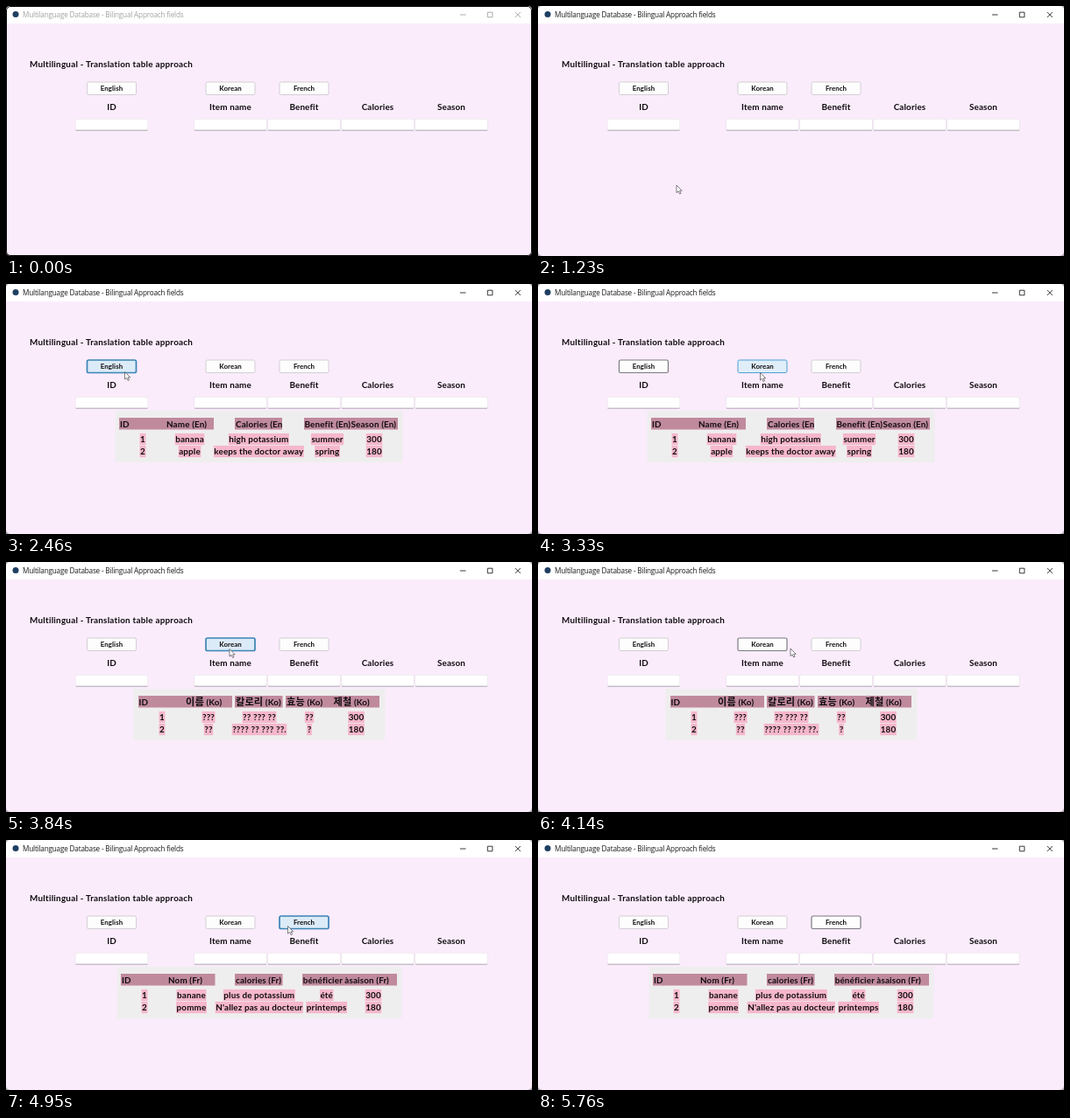
An HTML page for the animation above (5940 ms loop, 600x286 px).

```html
<!DOCTYPE html>
<html lang="en">
<head>
<meta charset="utf-8">
<title>Translation table demo</title>
<style>
  html, body { margin: 0; width: 100%; height: 100%; overflow: hidden; }
  svg { display: block; width: 600px; height: 286px; }
  text { font: bold 9.9px Lato, "Noto Sans CJK KR", "Noto Sans CJK", sans-serif; letter-spacing: .14px; fill: #100c10; white-space: pre; }
  .mid { text-anchor: middle; }
  .heading { letter-spacing: .24px; }
  .button text { font-size: 7.9px; letter-spacing: .05px; }
  .caption { font: 8.2px "Open Sans", "Noto Sans", sans-serif; letter-spacing: -.2px; fill: #1c1c1c; }
  .hangul { font-size: 11.2px; }
  .controls { fill: none; stroke: #222; stroke-width: .9; }
  .edge { fill: none; stroke: none; }
  .inactive .caption { fill: #a3a3a3; }
  .inactive .controls { stroke: #a0a0a0; }
  .inactive .back { fill: #000; }
  .inactive .edge { stroke: #000; }
  .button rect { fill: #fdfdfd; stroke: #d2ced3; }
  .button.hover rect { fill: #e0eef9; stroke: #4c9fd3; }
  .button.strong rect { fill: #dcebf8; stroke: #3b84b6; stroke-width: 1.7; }
  .button.pressed rect { fill: #cce4f7; stroke: #35709f; stroke-width: 1.4; }
  .button.focus rect { stroke: #7b7b80; stroke-width: 1.2; }
</style>
</head>
<body>
<svg id="stage" viewBox="0 0 600 286">
  <rect class="back" width="600" height="286" fill="#a7a2aa"/>
  <rect width="600" height="286" rx="5" fill="#faecfb"/>
  <path d="M0 20V5Q0 0 5 0H595Q600 0 600 5V20Z" fill="#fff"/>
  <rect class="edge" x=".5" y=".5" width="599" height="285" rx="4.5"/>
  <circle cx="11" cy="9.5" r="3.5" fill="#1f3f63"/>
  <text class="caption" x="19" y="12.9">Multilanguage Database - Bilingual Approach fields</text>
  <path class="controls" d="M518 10H524.5M549.3 7.2h5.6v5.6h-5.6ZM580.8 7l6 6m0-6l-6 6"/>
  <text class="heading" x="27" y="70.1">Multilingual - Translation table approach</text>
  <g id="form"></g>
  <g id="tables"></g>
  <path id="cursor" d="M0 0V8.6L2.1 6.8L3.6 10L5 9.3L3.6 6.3H6.2Z" fill="#fff" stroke="#4a484c" stroke-width=".7"/>
</svg>
<script>
const LOOP = 5940;
const $ = id => document.getElementById(id);

function add(parent, tag, attrs, content = "") {
  const node = document.createElementNS("http://www.w3.org/2000/svg", tag);
  for (const key in attrs) node.setAttribute(key, attrs[key]);
  node.innerHTML = content;
  return parent.appendChild(node);
}

const rect = (parent, x, y, width, height, fill, rx = 0) =>
  add(parent, "rect", { x, y, width, height, fill, rx });

const label = (parent, x, y, content, cls = "") =>
  add(parent, "text", { x, y, class: cls },
    content.replace(/[가-힣]+/g, '<tspan class="hangul">$&</tspan>'));

// Form: column titles, entry fields and language buttons
[[120.5, "ID"], [256, "Item name"], [340, "Benefit"], [424, "Calories"], [508, "Season"]]
  .forEach(([x, name]) => {
    label($("form"), x, 119.2, name, "mid");
    rect($("form"), x - 41.5, 129, 83, 13.5, "#e6e0e8", 1.5);
    rect($("form"), x - 41, 129.4, 82, 12.6, "#fff", 1.5);
    rect($("form"), x - 41, 141.7, 82, .9, "#aaa4ac");
  });

const buttons = [[120.5, "English"], [256, "Korean"], [340, "French"]].map(([x, name]) => {
  const group = add($("form"), "g", { class: "button" });
  rect(group, x - 28, 87, 56, 14.5, "", 1.8);
  label(group, x, 97.2, name, "mid");
  return group;
});

// Result tables: panel, header bars, header texts, column centres, rows
const tables = [
  {
    panel: [124.5, 452.5],
    bars: [[129, 237], [261, 315], [340, 447]],
    head: [[130, "ID"], [183, "Name (En)"], [262, "Calories (En"], [340.5, "Benefit (En)"], [393.5, "Season (En)"]],
    cols: [156, 209.5, 288.3, 366.5, 420],
    rows: [["1", "banana", "high potassium", "summer", "300"],
           ["2", "apple", "keeps the doctor away", "spring", "180"]]
  },
  {
    panel: [145.5, 432.5],
    bars: [[151, 258], [261, 315.5], [319, 426]],
    head: [[151.5, "ID"], [205, "이름 (Ko)"], [262, "칼로리 (Ko)"], [320, "효능 (Ko)"], [373.5, "제철 (Ko)"]],
    cols: [178, 231, 289, 346, 399.5],
    rows: [["1", "???", "?? ??? ??", "??", "300"],
           ["2", "??", "???? ?? ??? ??.", "?", "180"]]
  },
  {
    panel: [126.5, 451.5],
    bars: [[131, 238.5], [261, 315.5], [338, 446]],
    head: [[132, "ID"], [185, "Nom (Fr)"], [262, "calories (Fr)"], [338.7, "bénéficier àsaison (Fr)"]],
    cols: [158, 211.5, 288.8, 365.7, 419],
    rows: [["1", "banane", "plus de potassium", "été", "300"],
           ["2", "pomme", "N'allez pas au docteur", "printemps", "180"]]
  }
].map(({ panel: [left, right], bars, head, cols, rows }) => {
  const group = add($("tables"), "g", {});
  rect(group, left, 145, right - left, 59, "#efeeef");
  bars.forEach(([a, b]) => rect(group, a, 153, b - a, 13.5, "#c08a9d"));
  head.forEach(([x, name]) => label(group, x, 163.6, name));
  rows.forEach((row, r) => row.forEach((cell, c) => {
    const y = 180.9 + 14 * r;
    const text = label(group, cols[c], y, cell, "mid");
    const width = text.getComputedTextLength() + 1;
    group.insertBefore(rect(group, cols[c] - width / 2, y - 10, width, 13.3, "#f5b7cb"), text);
  }));
  return group;
});

// Time, pointer position, button states, visible table
const states = { n: "", h: "hover", s: "strong", p: "pressed", f: "focus" };
const steps = [
  [0, -50, 0, "nnn", -1],
  [1230, 158, 205, "nnn", -1],
  [2040, 136, 103, "nnn", -1],
  [2190, 135.5, 100.5, "hnn", -1],
  [2460, 135.5, 100.5, "snn", 0],
  [2730, 158, 103, "fnn", 0],
  [2850, 185, 104, "fnn", 0],
  [3030, 212, 103, "fnn", 0],
  [3150, 238, 101.5, "fhn", 0],
  [3330, 253.5, 101.5, "fhn", 0],
  [3450, 254.5, 100, "fhn", 0],
  [3690, 255, 99.5, "npn", 0],
  [3840, 255, 99.5, "nsn", 1],
  [3990, 262, 99.5, "nsn", 1],
  [4050, 274, 99, "nsn", 1],
  [4110, 288, 99, "nfn", 1],
  [4200, 302, 98.5, "nfn", 1],
  [4290, 314, 98.5, "nfh", 1],
  [4350, 321.5, 98.5, "nfh", 1],
  [4620, 321.5, 98.5, "nnp", 1],
  [4800, 321.5, 98.5, "nns", 2],
  [5760, -50, 0, "nnf", 2]
];

const start = performance.now();

function draw() {
  const t = (performance.now() - start) % LOOP;
  const [, x, y, looks, shown] = steps.findLast(step => step[0] <= t);
  $("stage").setAttribute("class", t < 1230 ? "inactive" : "");
  $("cursor").setAttribute("transform", `translate(${x} ${y})`);
  buttons.forEach((b, i) => b.setAttribute("class", "button " + states[looks[i]]));
  tables.forEach((table, i) => table.style.display = i === shown ? "" : "none");
  requestAnimationFrame(draw);
}
draw();
</script>
</body>
</html>
```
